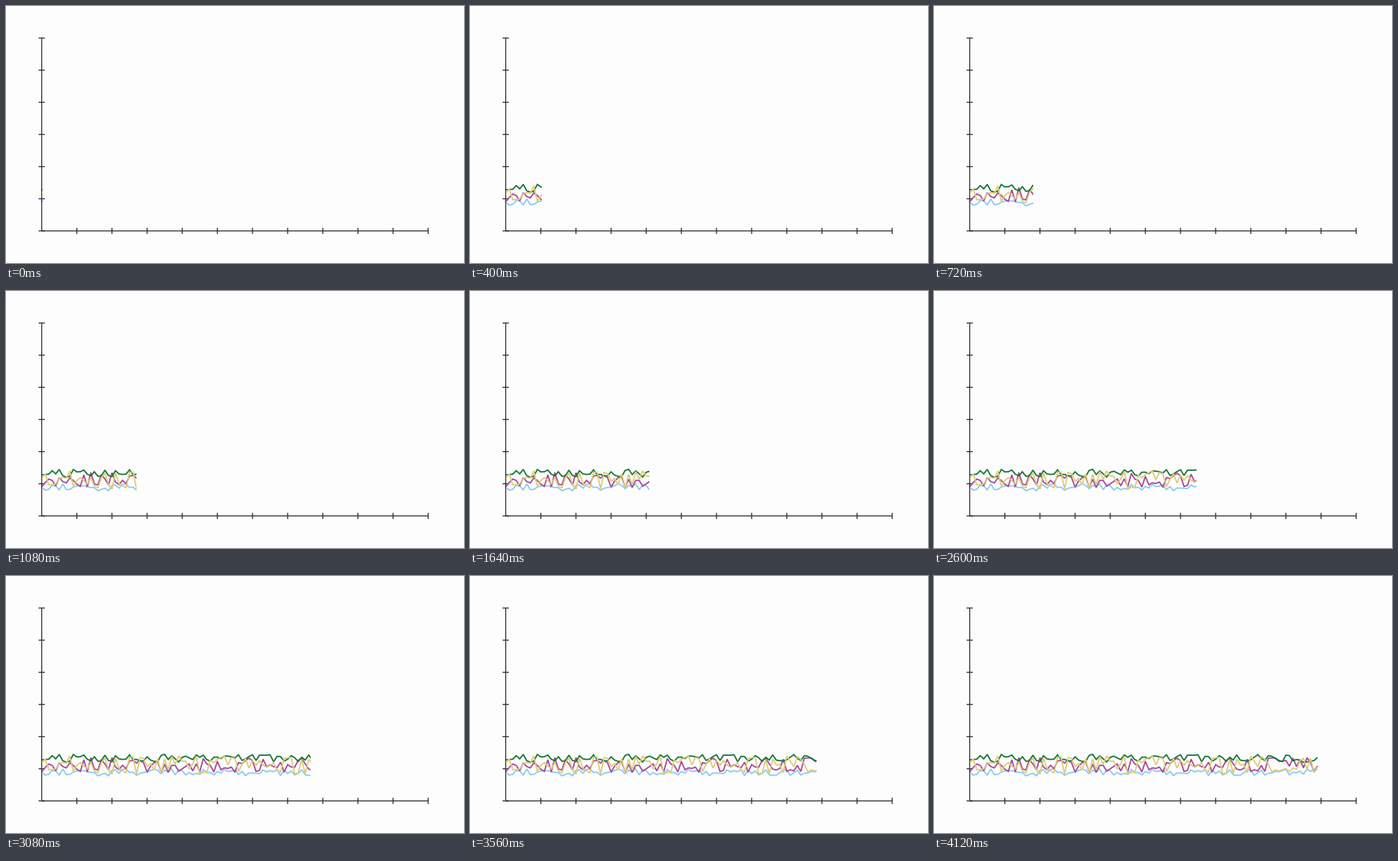
These frames come from a looping animation (600 px wide and 337 px high, 5 s). A matplotlib script:

```python
import numpy as np
import matplotlib.pyplot as plt
from matplotlib.animation import FuncAnimation
from matplotlib.patches import Rectangle

W, H, DPI = 600, 337, 100
FRAMES, STEP_MS = 125, 40
PX = 72 / DPI                      # one pixel in points

X0, Y0 = 46.75, 294.9              # origin of the chart
X_TICK, Y_TICK = 46.03, 42.15      # tick spacing
X_TICKS, Y_TICKS = 11, 6
TICK = 4.1                         # half length of a tick
INK = "#303030"

N_POINTS = 100
DX = X_TICK / 10
WIPE_START, WIPE_SPEED = 48.2, 4.555

# colour, first height, top and bottom of the noise band
SERIES = [
    ("#88ccee", 257, 253, 262),
    ("#aa4499", 257, 238, 258),
    ("#117733", 241, 233.5, 244.5),
    ("#ddcc77", 246, 235, 260),
]

fig = plt.figure(figsize=(W / DPI, H / DPI), dpi=DPI, facecolor="#fefdfe")
ax = fig.add_axes([0, 0, 1, 1])
ax.set_xlim(0, W)
ax.set_ylim(H, 0)
ax.axis("off")


def stroke(x, y, color=INK, width=1.3, **kw):
    line, = ax.plot(x, y, color=color, lw=width * PX, snap=False,
                    solid_capstyle="butt", **kw)
    return line


# Axes with ticks
stroke([X0, X0 + X_TICKS * X_TICK], [Y0, Y0])
stroke([X0, X0], [Y0, Y0 - Y_TICKS * Y_TICK])
for i in range(1, X_TICKS + 1):
    x = X0 + i * X_TICK
    stroke([x, x], [Y0 - TICK, Y0 + TICK])
for i in range(Y_TICKS + 1):
    y = Y0 - i * Y_TICK
    stroke([X0 - TICK, X0 + TICK], [y, y])

# Noise lines, revealed left to right by a shared clip
rng = np.random.default_rng(7)
wipe = Rectangle((X0, 0), 1, H, transform=ax.transData)
xs = X0 + DX * np.arange(N_POINTS)
lines = []
for color, first, top, bottom in SERIES:
    ys = rng.uniform(top, bottom, N_POINTS)
    ys[0] = first
    lines.append(stroke(xs, ys, color, 1.75, solid_joinstyle="miter", zorder=3))


def draw(n):
    wipe.set_width(WIPE_START + WIPE_SPEED * n - X0)
    for line in lines:
        line.set_clip_path(wipe)
    return lines


anim = FuncAnimation(fig, draw, frames=FRAMES, interval=STEP_MS,
                     repeat=True, repeat_delay=0, blit=False)
plt.show()
```
